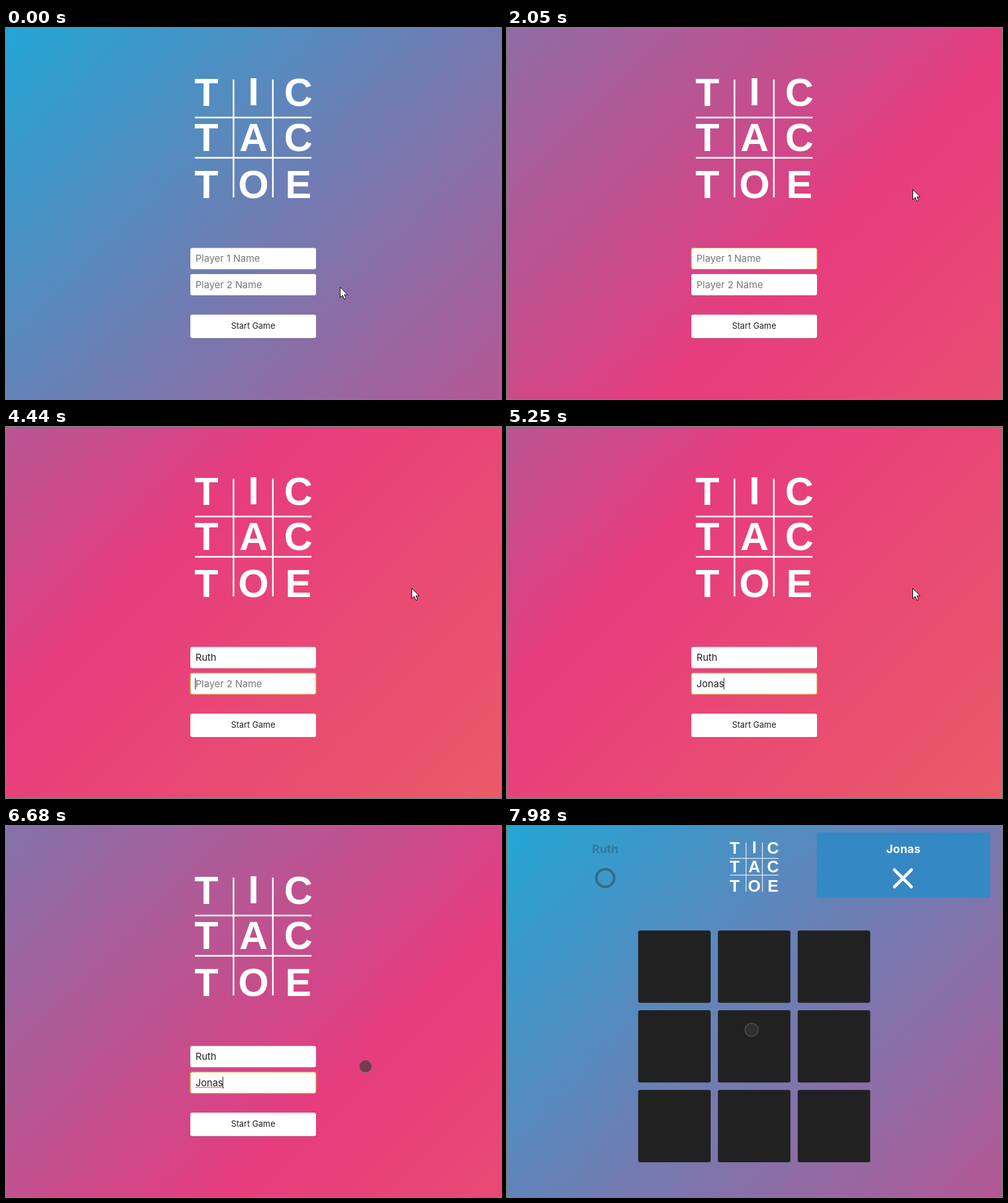
An HTML page that plays this animation: 768x576 px, repeating every 8000 ms.

```html
<!DOCTYPE html>
<html lang="en">
<head>
<meta charset="utf-8">
<title>Tic Tac Toe</title>
<style>
  html, body { margin: 0; width: 100%; height: 100%; overflow: hidden; }
  svg { display: block; width: 100%; height: 100%; }
  text { font-family: Inter, "Open Sans", sans-serif; }
  .logo text { font: bold 61px "Liberation Sans", Arial, sans-serif; fill: #fff; text-anchor: middle; }
  .logo path { stroke: #fff; stroke-width: 2.5; }
  .entry { font-size: 15px; }
  .button { font-size: 12.9px; fill: #222; text-anchor: middle; }
  .name { font-size: 18px; font-weight: 700; text-anchor: middle; }
</style>
</head>
<body>
<svg viewBox="0 0 768 576">
  <defs>
    <linearGradient id="sky" gradientUnits="userSpaceOnUse" x1="0" y1="0" x2="2688" y2="2688">
      <stop offset="0" stop-color="#23d5ab"/>
      <stop offset=".33333" stop-color="#23a6d5"/>
      <stop offset=".66667" stop-color="#e73c7e"/>
      <stop offset="1" stop-color="#ee7752"/>
    </linearGradient>
  </defs>
  <rect width="768" height="576" fill="url(#sky)"/>

  <g id="logo" class="logo">
    <path d="M353 80V263M414 80V263M293 139H474M293 201.5H474"/>
  </g>

  <g id="form">
    <g id="fields"></g>
    <path id="squiggle" fill="none" stroke="#d8434b" stroke-width="1"/>
    <rect id="caret" width="1" height="18" fill="#222"/>
    <rect x="286" y="446" width="195" height="37" rx="3" fill="#000" fill-opacity=".14"/>
    <rect x="286" y="445" width="195" height="36.5" rx="3" fill="#fff"/>
    <text class="button" x="383.5" y="467">Start Game</text>
  </g>

  <g id="game">
    <text class="name" x="152.5" y="42" fill="#222" fill-opacity=".27">Ruth</text>
    <circle cx="152.5" cy="80.7" r="13.8" fill="none" stroke="#222" stroke-opacity=".38" stroke-width="4"/>
    <rect x="480.5" y="10" width="269" height="101.5" fill="#3488c4"/>
    <text class="name" x="615" y="42" fill="#fff">Jonas</text>
    <path d="M601 68L627.5 94.500M627.500 68L601 94.500" stroke="#fff" stroke-width="4.6" stroke-linecap="round"/>
    <g id="cells" fill="#212121"></g>
  </g>

  <path id="arrow" d="M0 0V16L3.900 12.500L6.500 18.600L9 17.500L6.500 11.600H11.500Z" fill="#fff" stroke="#111" stroke-width="1" stroke-linejoin="round"/>
  <g id="dot">
    <circle r="11" fill="#808080" fill-opacity=".45"/>
    <circle r="9.500" fill="#000" fill-opacity=".36"/>
  </g>
</svg>

<script>
const LOOP = 8000, START_GAME = 7450, TOUCH = 5460;
const FOCUS = 1100, TAB = 4200, SPELL = 6500;
const PEAK = 5500, RISE = 7300, FALL = 7150;

const $ = id => document.getElementById(id);
const show = (el, on) => el.setAttribute('display', on ? 'inline' : 'none');
const move = (el, x, y) => el.setAttribute('transform', `translate(${x} ${y})`);

function add(parent, tag, attrs, text = '') {
  const el = document.createElementNS('http://www.w3.org/2000/svg', tag);
  for (const key in attrs) el.setAttribute(key, attrs[key]);
  el.textContent = text;
  return parent.appendChild(el);
}

[['TIC', 121], ['TAC', 190.5], ['TOE', 263.5]].forEach(([word, y]) =>
  [...word].forEach((letter, i) =>
    add($('logo'), 'text', { x: [311, 384, 453.5][i], y: letter === 'I' ? y - 1 : y }, letter)));

for (let i = 0; i < 9; i++) {
  add($('cells'), 'rect', {
    x: 203.5 + i % 3 * 123.75, y: 162.3 + Math.floor(i / 3) * 123.7,
    width: 112.5, height: 112.3, rx: 3
  });
}

const fields = [
  { y: 341.5, name: 'Ruth', hint: 'Player 1 Name', from: FOCUS, to: TAB, keys: [3100, 3290, 3450, 3650] },
  { y: 382, name: 'Jonas', hint: 'Player 2 Name', from: TAB, to: LOOP, keys: [4640, 4780, 4910, 5060, 5200] }
];
for (const f of fields) {
  f.box = add($('fields'), 'rect', { x: 286, y: f.y, width: 195, height: 33, rx: 3, fill: '#fff', 'stroke-width': 1.2 });
  f.label = add($('fields'), 'text', { class: 'entry', x: 294, y: f.y + 21.7 });
}

// CSS "ease": cubic-bezier(.25, .1, .25, 1)
function ease(x) {
  let lo = 0, hi = 1;
  const curve = (u, a, b) => 3 * a * u * (1 - u) ** 2 + 3 * b * u * u * (1 - u) + u ** 3;
  for (let i = 0; i < 24; i++) {
    const mid = (lo + hi) / 2;
    if (curve(mid, .25, .25) < x) lo = mid; else hi = mid;
  }
  return curve(lo, .1, 1);
}

// Stops are [time, x, y]
function along(stops, t) {
  const i = stops.findIndex(s => s[0] > t);
  if (i === 0) return stops[0].slice(1);
  if (i < 0) return stops[stops.length - 1].slice(1);
  const [t0, x0, y0] = stops[i - 1], [t1, x1, y1] = stops[i];
  const k = (t - t0) / (t1 - t0), s = k * k * (3 - 2 * k);
  return [x0 + (x1 - x0) * s, y0 + (y1 - y0) * s];
}

const mousePath = [[250, 518.5, 402.5], [550, 471, 386], [850, 431, 357], [1250, 431, 357], [1900, 629.5, 250.5]];
const touchPath = [[TOUCH, 630, 252], [5900, 698.5, 292.5], [6350, 698.5, 292.5], [7050, 392.5, 468],
  [7480, 392.5, 468], [7940, 379.5, 316.5]];

function drawField(f, t) {
  const typed = f.keys.filter(k => k <= t);
  const focused = t >= f.from && t < f.to;
  f.label.textContent = typed.length ? f.name.slice(0, typed.length) : f.hint;
  f.label.setAttribute('fill', typed.length ? '#222' : '#777');
  f.box.setAttribute('stroke', focused ? '#dfa437' : 'none');
  if (!focused) return;
  const width = typed.length ? f.label.getComputedTextLength() : 0;
  const since = t - (typed.length ? typed[typed.length - 1] : f.from);
  move($('caret'), 293.3 + width, f.y + 7.5);
  show($('caret'), since % 1000 < 500);
  if (t >= SPELL) {
    let d = `M294 ${f.y + 24.5}`;
    for (let x = 0; x < width - 2; x += 4) d += 'l2 -1.5l2 1.5';
    $('squiggle').setAttribute('d', d);
  }
}

function draw(t) {
  const pan = t < PEAK ? ease((t - PEAK + RISE) / RISE) : 1 - ease((t - PEAK) / FALL);
  const shift = -(864 + 2304 * pan) / 2;
  $('sky').setAttribute('gradientTransform', `translate(${shift} ${shift})`);

  const playing = t >= START_GAME;
  show($('form'), !playing);
  show($('game'), playing);
  $('logo').setAttribute('transform', playing ? 'translate(224 -7.5) scale(.416)' : '');
  show($('caret'), false);
  show($('squiggle'), t >= SPELL);
  if (!playing) fields.forEach(f => drawField(f, t));

  show($('arrow'), t < TOUCH);
  show($('dot'), t >= TOUCH);
  move($('arrow'), ...along(mousePath, t));
  move($('dot'), ...along(touchPath, t));
}

const begin = performance.now();
function tick() {
  draw((performance.now() - begin) % LOOP);
  requestAnimationFrame(tick);
}
tick();
</script>
</body>
</html>
```
